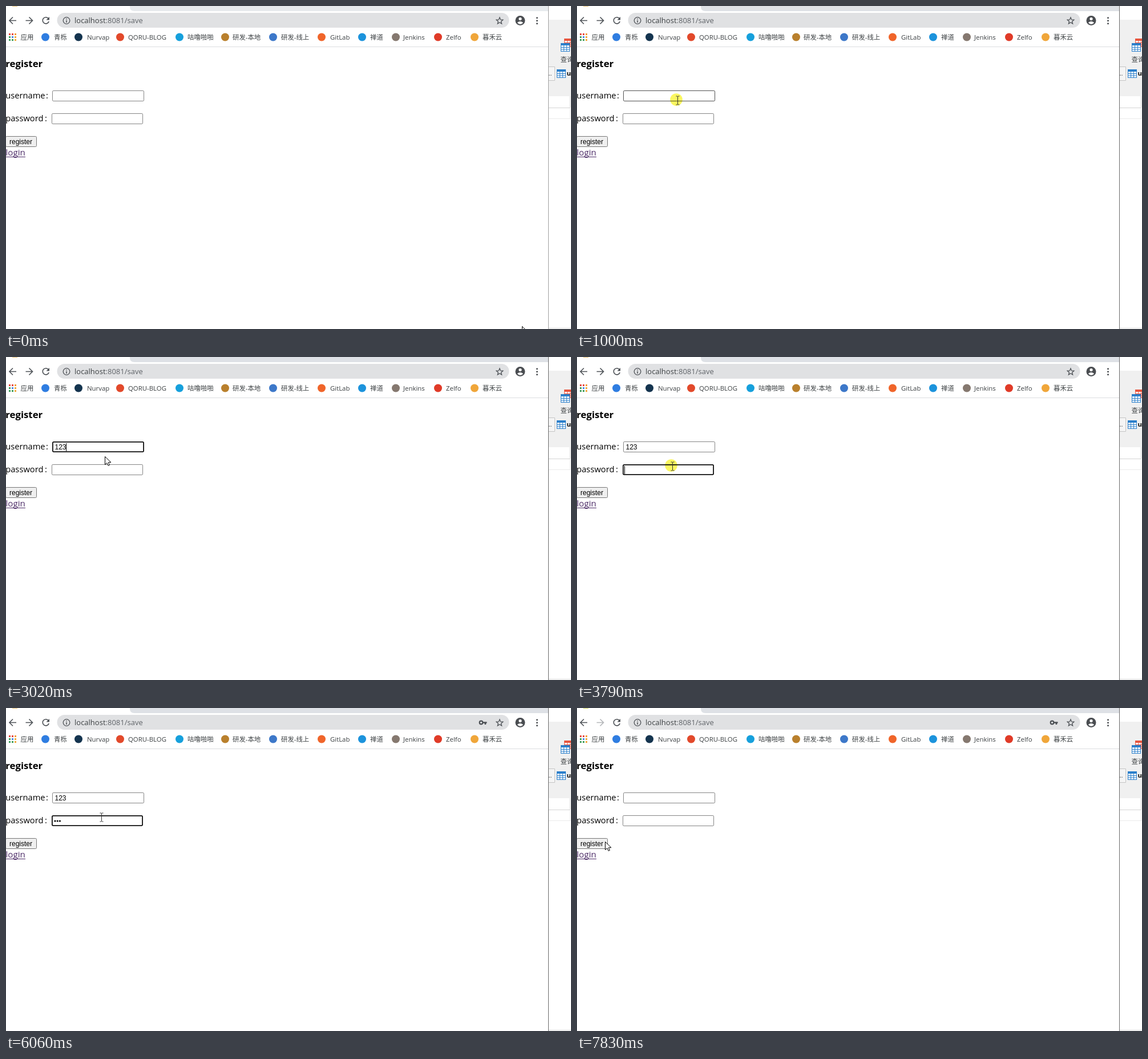
Recreate the animation shown at these times as an HTML page. Size 990 px wide and 566 px high, loop 8000 ms.

```html
<!DOCTYPE html>
<html lang="zh-CN">
<head>
<meta charset="utf-8">
<title>register</title>
<style>
  html, body { margin: 0; width: 100%; height: 100%; overflow: hidden; background: #fff; }
  svg { display: block; }
  .ui { font: 11.4px "Open Sans", "Noto Sans CJK SC", "Noto Sans CJK", sans-serif; fill: #3c4043; }
  .url { font-size: 13px; }
  .bold { font-weight: 700; fill: #111; }
  .page { font: 14.7px "Open Sans", sans-serif; fill: #000; }
  .heading { font-size: 16.8px; font-weight: 700; }
  .link { font-size: 15.1px; fill: #4b2a66; }
  .field { font: 12px "Liberation Sans", Arial, sans-serif; fill: #000; }
  .icon { fill: none; stroke: #4d5156; stroke-width: 1.6; }
  .thin { stroke-width: 1.3; }
  #options { font: 11.8px "Open Sans", sans-serif; fill: #222; }
</style>
</head>
<body>
<svg width="990" height="566" viewBox="0 0 990 566">
  <defs>
    <symbol id="table" width="16" height="15" viewBox="0 0 16 15">
      <rect x=".5" y=".5" width="15" height="14" fill="#fff" stroke="currentColor"/>
      <path d="M0 0H16V4H0Z" fill="currentColor"/>
      <path d="M0 7.5H16M0 11H16M5.5 4V15M10.5 4V15" stroke="currentColor"/>
    </symbol>
  </defs>

  <!-- window behind -->
  <path d="M951 24H990V158H951Z" fill="#f0f0f0"/>
  <path d="M951 178.5H988M988.5 158V178" stroke="#d4d4d4"/>
  <path d="M951 197.5H988M988.5 178V198" stroke="#ebebeb"/>
  <path d="M951 564.5H990" stroke="#dcdcdc"/>
  <use href="#table" x="978" y="57" color="#e8563f"/>
  <use href="#table" x="972" y="65" color="#2b7fcb"/>
  <text class="ui" x="971.5" y="98">查询</text>
  <path d="M951 106.5H961.5V130.5H951" fill="#f5f5f5" stroke="#c4c4c4"/>
  <text class="ui" x="950.5" y="122">..</text>
  <use href="#table" x="965" y="111" color="#2b7fcb"/>
  <text class="ui bold" x="982.5" y="122">us</text>

  <!-- browser frame -->
  <path id="strip" d="M217 0V1Q217 9 225 9H950V0Z"/>
  <path id="edge" d="M950.5 0V566"/>
  <rect id="favicon" x="11" width="9" height="1"/>
  <rect x="89.5" y="12" width="792" height="26" rx="13" fill="#e0e1e3"/>
  <path d="M0 71.5H950" stroke="#dcdddf"/>
  <path class="icon" d="M18 25.5H6.5M12 19.5L6 25.5L12 31.5"/>
  <path class="icon" id="forward" d="M34.5 25.5H46M40.5 19.5L46.5 25.5L40.5 31.5"/>
  <path class="icon" d="M74 21.5A5.6 5.6 0 1 0 75.2 27"/>
  <path d="M76 19V24.5H70.5Z" fill="#4d5156"/>
  <circle class="icon thin" cx="106" cy="25.5" r="5.8"/>
  <path d="M106 22V23.5M106 25V29" stroke="#4d5156" stroke-width="1.5"/>
  <text class="ui url" x="120" y="30">localhost<tspan fill="#5f6368">:8081/save</tspan></text>
  <g id="key">
    <circle cx="832.5" cy="25.5" r="2.8" fill="none" stroke="#4d5156" stroke-width="2.2"/>
    <path d="M836 24.3H842.5V26.8H841.2V29H838.6V26.8H836Z" fill="#4d5156"/>
  </g>
  <path class="icon thin" d="M865 20L866.6 23.9 870.8 24.2 867.6 26.9 868.6 31 865 28.8 861.4 31 862.4 26.9 859.2 24.2 863.4 23.9Z"/>
  <circle cx="901" cy="25.5" r="8.5" fill="#4a4d51"/>
  <circle cx="901" cy="22.6" r="2.6" fill="#fff"/>
  <path d="M895.8 29.3Q901 24.7 906.2 29.3Q901 34.5 895.8 29.3Z" fill="#fff"/>
  <path d="M930.5 20.7V20.71M930.5 25.7V25.71M930.5 30.7V30.71" stroke="#4a4d51" stroke-width="3" stroke-linecap="round"/>
  <g id="bookmarks"></g>

  <!-- page -->
  <g class="page">
    <text class="heading" x="-.8" y="107">register</text>
    <text x="-.8" y="162">username</text><text x="70" y="162">:</text>
    <text x="-.8" y="202">password</text><text x="68" y="202">:</text>
    <text class="link" x="-.5" y="262">login</text>
    <path d="M0 264.5H34" stroke="#4b2a66"/>
  </g>
  <rect id="button" x="-.5" y="228.5" width="54" height="18" rx="2"/>
  <text class="field" x="6" y="242">register</text>
  <rect id="userBox" fill="#fff"/>
  <rect id="passBox" fill="#fff"/>
  <text class="field" id="userText" x="85.5" y="162"></text>
  <g id="dots"><circle cx="86" cy="198" r="1.6"/><circle cx="90.2" cy="198" r="1.6"/><circle cx="94.4" cy="198" r="1.6"/></g>
  <rect id="caret" width="1" height="14"/>
  <svg id="popup" x="78" y="169" width="181">
    <rect x="3.5" y=".5" width="174" height="400" rx="2" fill="#fff" stroke="#dfdfdf"/>
    <g id="options"></g>
  </svg>

  <!-- pointer -->
  <circle id="glow" r="10.8" fill="#f8f200" fill-opacity=".62" style="mix-blend-mode:multiply"/>
  <path id="arrow" d="M.5 .5V14.5L3.9 11.6 6.1 16.4 8.4 15.4 6.3 10.7H11Z" fill="#fff" stroke="#000"/>
  <path id="beam" d="M-3 -7.5H-1L0 -7L1 -7.5H3M-3 7.5H-1L0 7L1 7.5H3M0 -7V7" fill="none" stroke="#333"/>
</svg>
<script>
const LOOP = 8000;
const $ = id => document.getElementById(id);
const set = (id, attrs) => Object.entries(attrs).forEach(([k, v]) => $(id).setAttribute(k, v));
const show = (id, on) => { $(id).style.display = on ? '' : 'none'; };
const within = (t, ...spans) => spans.some(([a, b]) => t >= a && t < b);

// The value of the last [time, value] pair that has begun.
const at = (t, steps) => steps.reduce((v, [time, next]) => t >= time ? next : v, steps[0][1]);

// icon x, icon colour, text x, label
const bookmarks = [
  [69, '#2f7de1', 84, '青栎'], [127, '#14344f', 142, 'Nurvap'],
  [200, '#e2492b', 214, 'QORU-BLOG'], [304, '#16a0dc', 318, '咕噜啪啪'],
  [384, '#b9802d', 397, '研发-本地'], [468, '#3d78c9', 482, '研发-线上'],
  [553, '#f0652a', 568, 'GitLab'], [624, '#1c93dc', 638, '禅道'],
  [683, '#85786f', 696, 'Jenkins'], [757, '#e03b28', 771, 'Zelfo'],
  [821, '#f0a63a', 835, '暮禾云']
];
const gridColours = ['#e8453c', '#e8453c', '#f29b38', '#3c9b57', '#4584ee', '#f2a73b', '#3c9b57', '#3c9b57', '#f2a73b'];
$('bookmarks').innerHTML =
  gridColours.map((c, i) => `<rect x="${5 + i % 3 * 5}" y="${48 + (i / 3 | 0) * 5}" width="3" height="3" fill="${c}"/>`).join('') +
  '<text class="ui" x="25.5" y="59">应用</text>' +
  bookmarks.map(([ix, c, tx, label]) =>
    `<circle cx="${ix}" cy="54.5" r="7" fill="${c}"/><text class="ui" x="${tx}" y="59">${label}</text>`).join('');

// start, interval, number of steps, end point
const moves = [
  [70, 80, 6, 235, 215], [620, 75, 3, 176, 165], [3020, 77.5, 5, 167, 191],
  [6200, 77, 8, 50, 235], [6980, 1, 1, 49, 234]
];
function pointer(t) {
  let x = 904, y = 561;
  for (const [start, interval, count, endX, endY] of moves) {
    if (t < start) break;
    const p = Math.min(count, Math.floor((t - start) / interval + 1e-6) + 1) / count;
    const ease = 1 - (1 - p) ** 2;
    x += (endX - x) * ease;
    y += (endY - y) * ease;
  }
  return [Math.round(x), Math.round(y)];
}

function drawBox(id, x, y, w, h, focused, hovered) {
  const line = focused ? 1.8 : .9;
  set(id, {
    x: x + line / 2, y: y + line / 2, width: w - line, height: h - line, rx: 1.8,
    stroke: focused ? '#101010' : hovered ? '#3a3a3a' : '#767676', 'stroke-width': line
  });
}

const allNames = ['123', 'admin', 'ok1', 'test', 'demo', 'root'];
const userValue = [[0, ''], [2100, '1'], [2240, '12'], [2560, '123'], [7670, '']];
const passLength = [[0, 0], [4720, 1], [4950, 2], [5500, 3], [7670, 0]];
const popupBottom = [[0, 0], [2100, 254], [2160, 382], [2240, 252], [2560, 0]];
const focusOrder = [[0, ''], [1080, 'user'], [3790, 'pass'], [7670, '']];

function draw(t) {
  const [x, y] = pointer(t);
  const over = (l, top, r, b) => x >= l && x < r && y >= top && y < b;
  const overUser = over(81, 148, 242, 167), overPass = over(80, 188, 240, 207);
  const overButton = over(0, 228, 54, 247);
  const focus = at(t, focusOrder), active = t >= 1000;

  set('strip', { fill: active ? '#dee1e6' : '#e7eaed' });
  set('edge', { stroke: active ? '#6b6b6b' : '#a0a0a0' });
  set('favicon', { fill: t < 7830 ? '#f0c878' : '#d3dc62' });
  $('forward').style.stroke = t < 7750 ? '' : '#b4b6b9';
  show('key', t >= 4720);

  drawBox('userBox', 81, 148, 161, 19, focus === 'user', overUser);
  drawBox('passBox', 80, 188, 160, 19, focus === 'pass', overPass);
  const pressed = within(t, [7520, 7670]), hovered = overButton && t < 7670;
  set('button', { fill: pressed ? '#f5f5f5' : hovered ? '#e5e5e5' : '#efefef', stroke: hovered && !pressed ? '#4a4a4a' : '#767676' });

  const name = at(t, userValue), length = at(t, passLength);
  $('userText').textContent = name;
  [...$('dots').children].forEach((dot, i) => { dot.style.display = i < length ? '' : 'none'; });
  show('caret', within(t, [1080, 1540], [2100, 3070], [3560, 4350], [4720, 6060], [6590, 7150]));
  set('caret', focus === 'pass'
    ? { x: [83, 88, 91, 96][length], y: 191 }
    : { x: Math.round(85 + name.length * 6.67), y: 151 });

  const bottom = at(t, popupBottom);
  show('popup', bottom);
  set('popup', { height: Math.max(0, bottom - 169) });
  $('options').innerHTML = (t < 2240 ? allNames : ['123', '12'])
    .map((s, i) => `<text x="14.5" y="${27 + i * 33}">${s}</text>`).join('');

  show('glow', within(t, [1000, 1080], [3790, 3940], [7520, 7670]));
  set('glow', { cx: x - 2, cy: y - 1 });
  const beam = overUser || overPass;
  show('beam', beam);
  show('arrow', !beam);
  set('beam', { transform: `translate(${x + .5} ${y + .5})` });
  set('arrow', { transform: `translate(${x} ${y})` });
}

(function frame() {
  draw(performance.now() % LOOP);
  requestAnimationFrame(frame);
})();
</script>
</body>
</html>
```
